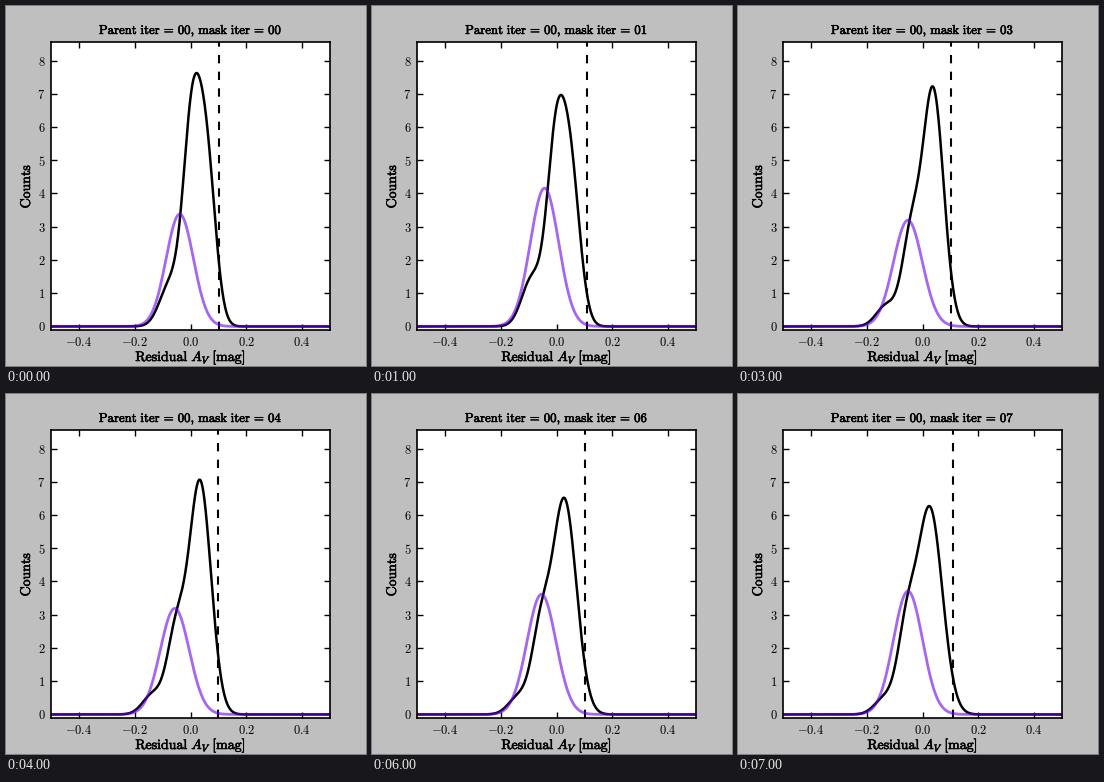
Recreate the animation shown at these times as a matplotlib script. Size 360 by 360 pixels, loop 8000 ms.

```python
import numpy as np
import matplotlib.pyplot as plt
from matplotlib.animation import FuncAnimation
from matplotlib.patheffects import withStroke

SIZE, DPI, STEPS = 360, 100, 8
plt.rcParams.update({
    "mathtext.fontset": "cm",
    "lines.scale_dashes": False,
    "axes.linewidth": 1.2,
})

# Key iterations and the values that do not follow a smooth decay.
KEYS = [0, 1, 2, 4, 5, 7]
MAIN_HEIGHT = [4.5, 4.4, 7.15, 6.98, 6.70, 6.17]
TAIL_HEIGHT = [1.2, 1.4, 0.66, 0.60, 0.57, 0.48]
MODEL_HEIGHT = [3.38, 4.16, 3.20, 3.19, 3.52, 3.71]
MODEL_CENTRE = [-0.0385, -0.043, -0.048, -0.0565, -0.0555, -0.052]
CUT = [0.102, 0.109, 0.102, 0.0985, 0.102, 0.109]


def bump(x, height, centre, width):
    return height * np.exp(-0.5 * ((x - centre) / width) ** 2)


def settle(i, start, end, scale, power=2):
    """Relax from start to end over the iterations."""
    return end + (start - end) * np.exp(-(i / scale) ** power)


def density_at(x, i):
    main = bump(x, np.interp(i, KEYS, MAIN_HEIGHT),
                settle(i, 0.0591, 0.0197, 4, power=1), 0.032 + 0.0018 * i)
    flank = bump(x, settle(i, 6.02, 2.35, 1.9),
                 settle(i, 0.0054, -0.0573, 2.6), 0.0328)
    tail = bump(x, np.interp(i, KEYS, TAIL_HEIGHT),
                settle(i, -0.076, -0.136, 2), 0.036)
    return main + flank + tail


def model_at(x, i):
    return bump(x, np.interp(i, KEYS, MODEL_HEIGHT),
                np.interp(i, KEYS, MODEL_CENTRE),
                settle(i, 0.0487, 0.052, 1, power=1))


def cut_at(i):
    """The cut holds its value until the next key iteration."""
    return CUT[np.searchsorted(KEYS, i, side="right") - 1]


def roman(text):
    """Set text upright; relations and commas already bring some space."""
    text = text.replace(" = ", r"\,=\,").replace(", ", r",\,")
    return r"$\mathrm{%s}$" % text.replace(" ", r"\ ")


def label(x, y, text, size, **kw):
    """Place centred, slightly heavy text with its baseline at a pixel."""
    return fig.text(x / SIZE, 1 - y / SIZE, text, size=size,
                    ha="center", va="baseline",
                    path_effects=[withStroke(linewidth=0.4,
                                             foreground="black")], **kw)


fig = plt.figure(figsize=(SIZE / DPI, SIZE / DPI), dpi=DPI, facecolor="0.75")
ax = fig.add_axes([0.125, 0.1, 0.775, 0.8])
ax.set_xlim(-0.5, 0.5)
ax.set_ylim(-0.107, 8.557)

xticks = np.linspace(-0.4, 0.4, 5)
yticks = range(9)
ax.set_xticks(xticks, [f"${v:.1f}$" for v in xticks])
ax.set_yticks(yticks, [f"${v}$" for v in yticks])
ax.tick_params(direction="in", top=True, right=True, length=4, width=1,
               pad=4, labelsize=9)

title = label(184.5, 28, "", 9.2)
label(184.5, 355, r"$\mathrm{Residual}\ A_V\ \mathrm{[mag]}$", 10)
label(24, 180, roman("Counts"), 10, rotation=90, rotation_mode="anchor")

x = np.linspace(-0.5, 0.5, 600)
density, = ax.plot(x, 0 * x, color="black", lw=1.8, zorder=2)
model, = ax.plot(x, 0 * x, color=(105 / 255, 0, 238 / 255), alpha=0.6,
                 lw=2, zorder=2.1)
cut = ax.axvline(CUT[0], color="black", lw=1.5, ls=(0, (6, 6)), zorder=2)


def update(i):
    density.set_ydata(density_at(x, i))
    model.set_ydata(model_at(x, i))
    cut.set_xdata([cut_at(i)] * 2)
    title.set_text(roman(f"Parent iter = 00, mask iter = {i:02d}"))
    return density, model, cut, title


anim = FuncAnimation(fig, update, frames=STEPS, interval=1000,
                     repeat=True, repeat_delay=0, blit=False)
plt.show()
```
